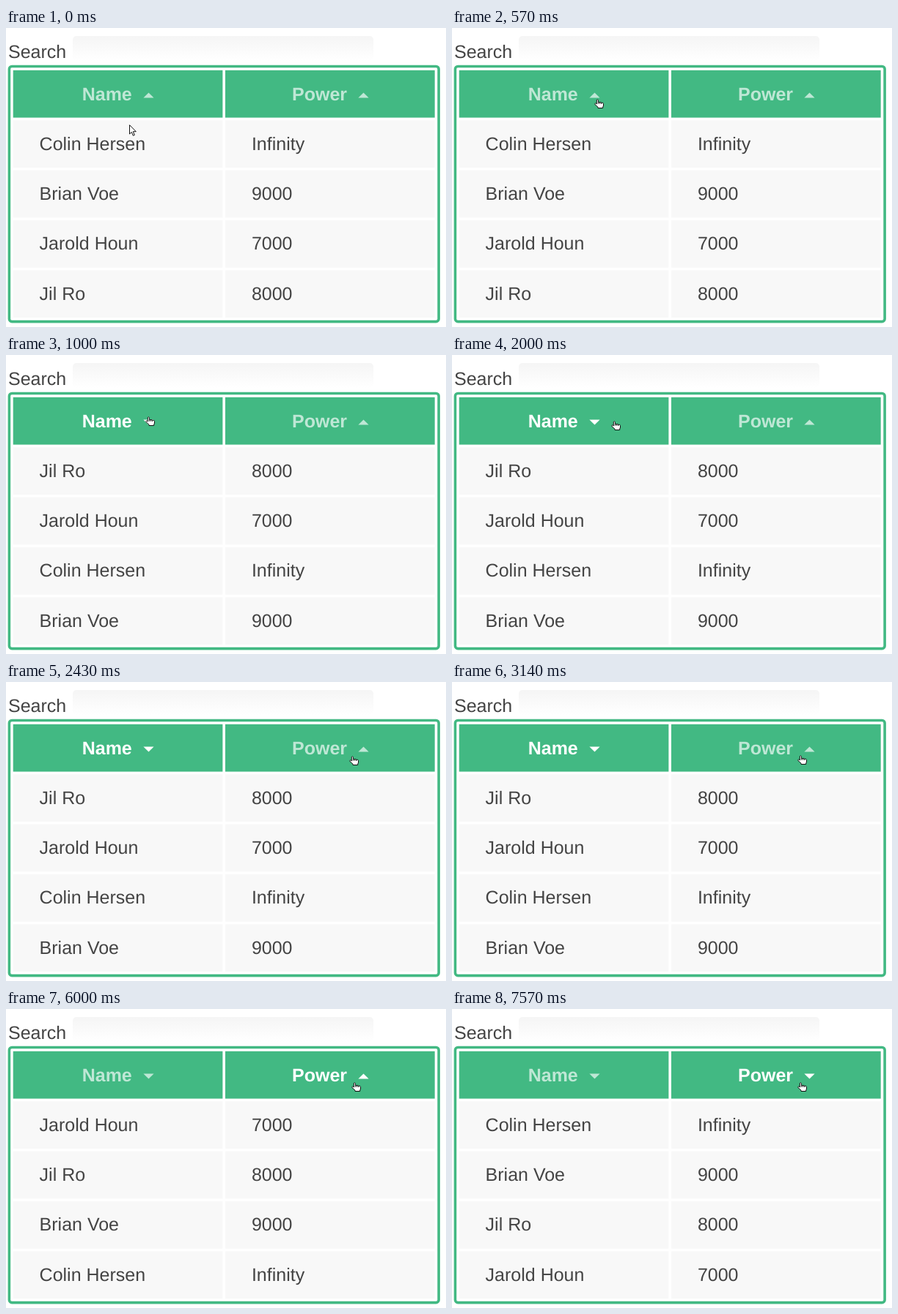
Recreate the animation shown at these times as an HTML page. Size 600 by 409 pixels, loop 8000 ms.

```html
<!DOCTYPE html>
<html lang="en">
<head>
<meta charset="utf-8">
<title>Sortable grid</title>
<style>
  html, body { margin: 0; width: 100%; height: 100%; overflow: hidden; background: #fff; }
  svg { display: block; width: 600px; height: 409px; }
  text { font: 25px "Liberation Sans", Arial, sans-serif; fill: #444; white-space: pre; text-rendering: geometricPrecision; }
  .head { font-weight: bold; fill: #fff; }
  .cursor path { fill: #fff; stroke: #111; stroke-width: 1; stroke-linejoin: round; }
</style>
</head>
<body>
<svg id="stage" viewBox="0 0 600 409" xmlns="http://www.w3.org/2000/svg">
  <defs>
    <linearGradient id="field" x1="0" y1="0" x2="0" y2="1">
      <stop offset="0" stop-color="#f5f5f5"/>
      <stop offset="1" stop-color="#fff"/>
    </linearGradient>
  </defs>
  <rect width="600" height="409" fill="#fff"/>
  <text x="3" y="41">Search</text>
  <rect x="91" y="11" width="410" height="34" rx="5" fill="url(#field)"/>
  <rect x="4.4" y="52.5" width="585.7" height="349.1" rx="3.6" fill="#fff" stroke="#42b983" stroke-width="3.57"/>
  <g id="grid"></g>
  <g id="arrow" class="cursor">
    <path d="M.5 .7V13L3.3 10.4L5.3 15.2L7.3 14.4L5.3 9.7H9.3Z"/>
  </g>
  <g id="hand" class="cursor">
    <path d="M3.3 1.5Q4.4 .1 5.4 1.5V4.6H8Q9.4 4.6 9.8 5.2L11.6 5.4Q12.5 5.6 12.5 6.6V9Q12.4 10 11.7 11V12.5H5V11.2L1 7.6Q.2 6.5 1.5 6Q2.3 5.9 3.3 7Z"/>
    <path d="M5.4 4.6V6.8M7.6 4.8V6.8M9.8 5.2V7"/>
  </g>
</svg>
<script>
const LOOP = 8000;
const people = [
  ["Colin Hersen", "Infinity"],
  ["Brian Voe", "9000"],
  ["Jarold Houn", "7000"],
  ["Jil Ro", "8000"]
];
const CELL = { width: 285.7, height: 64.8, pitch: 68.4, top: 57.8 };
const columns = [
  { title: "Name", left: 9.7, titleX: 103.7, arrowX: 187.4, textX: 45.6 },
  { title: "Power", left: 299, titleX: 390, arrowX: 480.4, textX: 334.9 }
];

// key: sorted column (-1 for none); dirs: 1 points up, -1 points down
const sorts = [
  { at: 0, key: -1, dirs: [1, 1] },
  { at: 1000, key: 0, dirs: [-1, 1] },
  { at: 4000, key: 1, dirs: [-1, -1] },
  { at: 6000, key: 1, dirs: [-1, 1] },
  { at: 7570, key: 1, dirs: [-1, -1] }
];
const moves = [
  { at: 0, shape: "arrow", x: 168, y: 132 },
  { at: 140, shape: "arrow", x: 171, y: 129 },
  { at: 290, shape: "hand", x: 206, y: 78 },
  { at: 570, shape: "hand", x: 194, y: 97 },
  { at: 710, shape: "hand", x: 191, y: 87 },
  { at: 860, shape: "hand", x: 190, y: 84 },
  { at: 2000, shape: "hand", x: 217, y: 90 },
  { at: 2140, shape: "arrow", x: 467, y: 131 },
  { at: 2430, shape: "hand", x: 468, y: 101 },
  { at: 2860, shape: "hand", x: 470, y: 100 },
  { at: 3140, shape: "hand", x: 471, y: 100 }
];

const byId = id => document.getElementById(id);
const grid = byId("grid");

function add(tag, attrs, content = "") {
  const el = document.createElementNS("http://www.w3.org/2000/svg", tag);
  for (const name in attrs) el.setAttribute(name, attrs[name]);
  el.textContent = content;
  return grid.appendChild(el);
}

function addBox(x, row, fill) {
  const y = CELL.top + row * CELL.pitch;
  add("rect", { x, y, width: CELL.width, height: CELL.height, fill });
}

for (const col of columns) {
  addBox(col.left, 0, "#42b983");
  col.head = add("text", { x: col.titleX, y: 99, class: "head" }, col.title);
  col.arrow = add("path", { fill: "#fff" });
  col.cells = people.map((_, i) => {
    addBox(col.left, i + 1, "#f8f8f8");
    return add("text", { x: col.textX, y: Math.floor(167 + i * CELL.pitch) });
  });
}

const current = (list, t) => list.filter(item => item.at <= t).pop();
const rank = value => isNaN(Number(value)) ? value : Number(value);

function sorted({ key, dirs }) {
  if (key < 0) return people;
  return [...people].sort((a, b) => (rank(a[key]) > rank(b[key]) ? 1 : -1) * dirs[key]);
}

function draw(t) {
  const sort = current(sorts, t);
  const rows = sorted(sort);
  columns.forEach((col, c) => {
    const alpha = c === sort.key ? 1 : 0.66;
    const [base, tip] = sort.dirs[c] > 0 ? [95.5, 88.4] : [88.4, 95.5];
    col.head.setAttribute("fill-opacity", alpha);
    col.arrow.setAttribute("fill-opacity", alpha);
    col.arrow.setAttribute("d", `M${col.arrowX} ${base}h14.2L${col.arrowX + 7.1} ${tip}Z`);
    col.cells.forEach((cell, r) => {
      if (cell.textContent !== rows[r][c]) cell.textContent = rows[r][c];
    });
  });
  const move = current(moves, t);
  for (const shape of ["arrow", "hand"]) {
    const el = byId(shape);
    el.setAttribute("display", shape === move.shape ? "inline" : "none");
    el.setAttribute("transform", `translate(${move.x} ${move.y})`);
  }
}

const start = performance.now();
function tick() {
  draw((performance.now() - start) % LOOP);
  requestAnimationFrame(tick);
}
tick();
</script>
</body>
</html>
```
